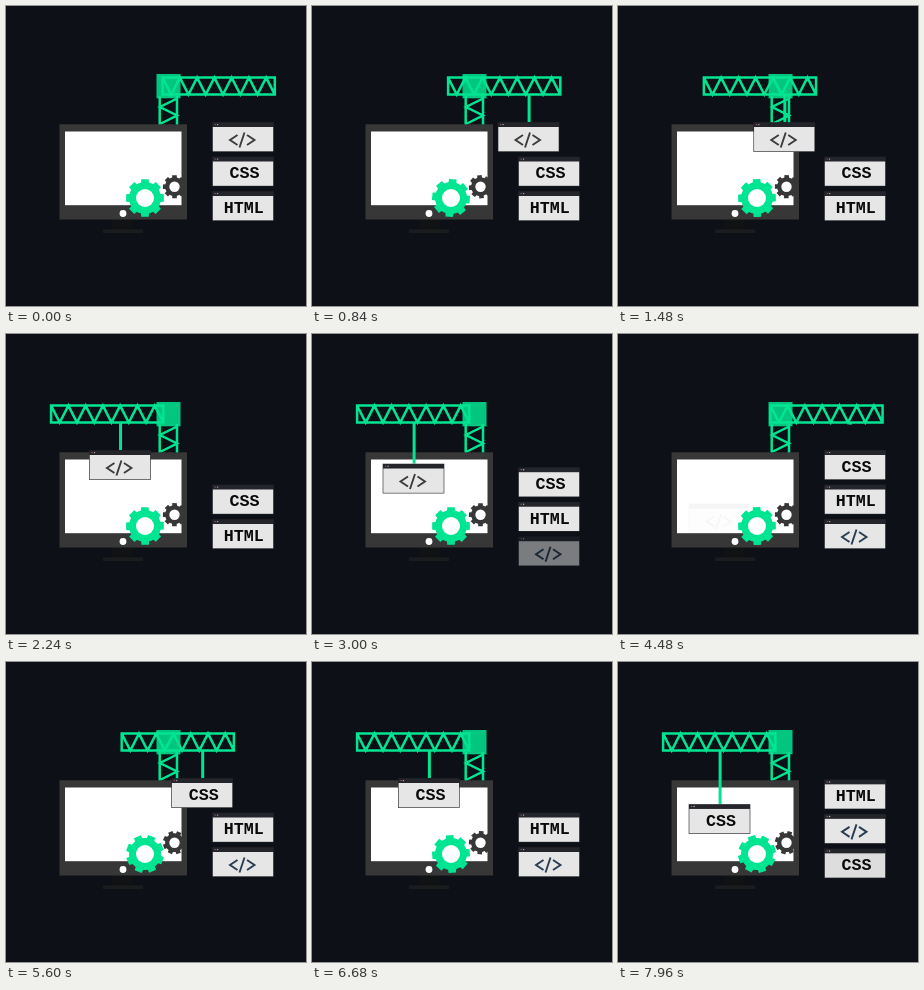
Recreate the animation shown at these times as an HTML page. Size 300x300 px, loop 8000 ms.

```html
<!DOCTYPE html>
<html lang="en">
<head>
<meta charset="utf-8">
<title>Crane building a page</title>
<style>
  html, body { margin: 0; width: 100%; height: 100%; overflow: hidden; background: #0d1117; }
  svg { display: block; width: 100%; height: 100%; }
  .line { fill: none; stroke: #00e592; stroke-width: 2.5; }
  .icon { fill: none; stroke-width: 1.9; }
  text { font: bold 16.67px "Courier New", "Liberation Mono", monospace; text-anchor: middle; fill: #0a0a0a; }
</style>
</head>
<body>
<svg viewBox="0 0 300 300">
  <path class="line" d="M153.7 90V120M171 90V120M171 92.5L154 101L171 109.5L154 118"/>

  <rect x="107" y="213" width="20" height="11" fill="#111214"/>
  <rect x="97" y="223.5" width="40" height="3.5" fill="#1b1c1e"/>
  <rect x="53.5" y="118.3" width="127.5" height="95.2" fill="#373737"/>
  <rect x="59" y="125.5" width="116.5" height="73.7" fill="#fff"/>
  <circle cx="117" cy="207.5" r="3.4" fill="#fff"/>

  <path id="rope" class="line" style="stroke-width:3"/>
  <g id="cards"></g>

  <g transform="translate(168.5 180.7)">
    <path id="smallGear" fill="#373737"/>
    <circle r="5.2" fill="#fff"/>
  </g>
  <g transform="translate(139 192)">
    <path id="bigGear" fill="#00e592"/>
    <circle r="9" fill="#fff"/>
  </g>

  <path id="jib" class="line"/>
  <rect x="150.5" y="68" width="24" height="24.3" fill="#00e592" opacity=".85"/>
</svg>
<script>
const LOOP = 8000, CYCLE = 4500;
const SLOT_X = 206.2, SLOT_Y = 116.2, PITCH = 34.5;
const JIB_TRAVEL = 111.5, TROLLEY_TRAVEL = 135.5;
const GEAR_SPEED = 360 / 6000;
const $ = id => document.getElementById(id);

// Linear interpolation through [time, value] stops
function track(time, stops) {
  for (let i = 1; i < stops.length; i++) {
    const [t0, v0] = stops[i - 1], [t1, v1] = stops[i];
    if (time < t1) return v0 + (v1 - v0) * Math.max(0, (time - t0) / (t1 - t0));
  }
  return stops[stops.length - 1][1];
}

function trussPath(left, top, width, height, segments) {
  let zigzag = `M${left} ${top}`;
  for (let i = 1; i <= segments; i++) {
    zigzag += `L${left + width * i / segments} ${top + (i % 2) * height}`;
  }
  return `M${left} ${top}h${width}v${height}h${-width}z` + zigzag;
}

function gearPath(outer, root, teeth) {
  const step = 2 * Math.PI / teeth;
  const points = [];
  const add = (radius, angle) =>
    points.push(`${(radius * Math.cos(angle)).toFixed(2)} ${(radius * Math.sin(angle)).toFixed(2)}`);
  for (let i = 0; i < teeth; i++) {
    const angle = i * step;
    add(root, angle - step * .32);
    add(outer, angle - step * .25);
    add(outer, angle + step * .25);
    add(root, angle + step * .32);
    add(root, angle + step * .5);
  }
  return `M${points.join("L")}z`;
}

const codeIcon = color =>
  `<path class="icon" stroke="${color}" d="M25.3 12.8L17.8 17.8L25.3 22.8M32.3 10.3L27.3 25.3M34.8 12.8L42.3 17.8L34.8 22.8"/>`;
const label = (word, x) => `<text x="${x}" y="21.6">${word}</text>`;

const contents = [
  codeIcon("#3c3c3c"), label("CSS", 32.4), label("HTML", 31.6),
  codeIcon("#273c52"), label("CSS", 32.4)
];
$("cards").innerHTML = contents.map(content => `<g>
  <rect width="61.6" height="29.7" fill="#23252b"/>
  <rect x=".6" y="4.8" width="60.4" height="24.3" fill="#e6e6e6"/>
  <circle cx="3" cy="2.4" r=".7" fill="#b55"/>
  <circle cx="5.4" cy="2.4" r=".7" fill="#bbb"/>
  ${content}</g>`).join("");
const cards = [...$("cards").children];

$("jib").setAttribute("d", trussPath(156.6, 71.6, 112.2, 17, 13));
$("bigGear").setAttribute("d", gearPath(19.2, 16, 8));
$("smallGear").setAttribute("d", gearPath(11.8, 9.4, 8));

function place(card, x, y, opacity) {
  card.setAttribute("transform", `translate(${x} ${y})`);
  card.setAttribute("opacity", opacity);
}

function draw(time) {
  const cycle = Math.floor(time / CYCLE), t = time % CYCLE;
  const jib = track(t, [[580, 0], [2000, JIB_TRAVEL], [4000, JIB_TRAVEL], [4500, 0]]);
  const carried = track(t, [[580, 0], [2000, JIB_TRAVEL], [2500, TROLLEY_TRAVEL]]);
  const trolley = t < 4000 ? carried : track(t, [[4000, TROLLEY_TRAVEL], [4500, 0]]);
  const hook = track(t, [[0, 88], [580, 116], [2500, 116], [4000, 156.5], [4500, 88]]);
  const drop = track(t, [[2500, 0], [4500, 54]]);
  const fade = track(t, [[4000, 1], [4500, 0]]);
  const advance = track(t, [[2500, 0], [3500, 1]]);

  $("jib").setAttribute("transform", `translate(${-jib} 0)`);
  $("rope").setAttribute("d", `M${237.6 - trolley} 88V${hook}`);

  cards.forEach((card, i) => {
    const rank = i - cycle;
    if (rank === 0) place(card, SLOT_X - carried, SLOT_Y + drop, fade);
    else {
      const opacity = rank < 0 || rank > 3 ? 0 : rank === 3 ? advance : 1;
      place(card, SLOT_X, SLOT_Y + PITCH * (rank - advance), opacity);
    }
  });

  $("bigGear").setAttribute("transform", `rotate(${time * GEAR_SPEED})`);
  $("smallGear").setAttribute("transform", `rotate(${-time * GEAR_SPEED})`);
}

const start = performance.now();
function tick() {
  draw((performance.now() - start) % LOOP);
  requestAnimationFrame(tick);
}
tick();
</script>
</body>
</html>
```
